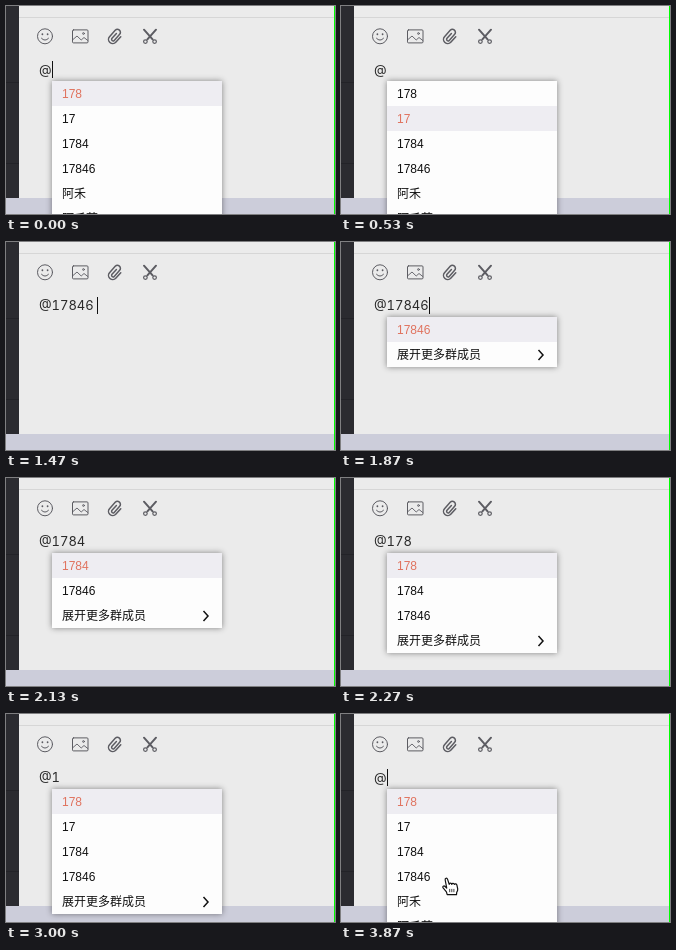
These frames come from a looping animation (329x208 px, 3940 ms). An HTML page:

```html
<!DOCTYPE html>
<html lang="zh">
<head>
<meta charset="utf-8">
<style>
html, body { margin: 0; width: 100%; height: 100%; overflow: hidden; }
body { position: relative; background: #ebebeb; }
svg, #input, #menu { position: absolute; }
#scene, #hand { left: 0; top: 0; }
#input { left: 33px; top: 53px; font: 13px/20px Inter, sans-serif; font-variant-numeric: tabular-nums; white-space: pre; color: #2a2a2a; }
#caret { display: inline-block; width: 1px; height: 17px; vertical-align: -4px; background: #111; }
#menu { left: 46px; top: 75px; width: 170px; background: #fdfdfd; box-shadow: 0 0 6px rgba(0, 0, 0, .45); font: 12px "Liberation Sans", "Noto Sans CJK SC", "Noto Sans CJK", sans-serif; }
.row { height: 25px; line-height: 26px; padding-left: 10px; position: relative; }
.row svg { left: 150px; top: 7px; }
</style>
</head>
<body>
<svg id="scene" width="329" height="208">
  <path fill="#2b2b30" d="M0 0h13v192H0z"/>
  <path fill="#232328" d="M0 76h13v1H0zM0 157h13v1H0z"/>
  <path fill="#d6d6d6" d="M13 11h315v1H13z"/>
  <path fill="#cccdda" d="M0 192h328v16H0z"/>
  <path fill="#0f0" d="M328 0h1v208h-1z"/>
  <g fill="none" stroke="#5c5c62" stroke-linecap="round" stroke-linejoin="round">
    <circle cx="39" cy="30.3" r="7.5"/>
    <path d="M35.5 32.3q3.5 3.8 7 0"/>
    <path stroke-width="1.8" d="M36.4 28.2v.1M41.6 28.2v.1"/>
    <rect x="66.5" y="23.9" width="15.5" height="13" rx="1"/>
    <path stroke-width=".9" d="M67 33.5l4-3.5 4.2 4 2.8-2.5 3.8 3"/>
    <circle cx="77.5" cy="27.5" r=".9" stroke-width=".9"/>
    <path stroke-width="1.5" transform="translate(109.3 30.5) rotate(42)"
      d="M4.2-3.5V4a4.2 4 0 0 1-8.4 0V-4.5a3 3 0 0 1 6 0V3.6a1.5 1.5 0 0 1-3 0V-3"/>
    <path stroke-width="2" d="M138 23.7l8.6 9.6M150 23.7l-8.6 9.6"/>
    <circle cx="139.4" cy="35.6" r="1.8" stroke-width="1.2"/>
    <circle cx="148.6" cy="35.6" r="1.8" stroke-width="1.2"/>
  </g>
</svg>
<div id="input"><span id="text"></span><span id="caret"></span></div>
<div id="menu"></div>
<svg id="hand" width="329" height="208">
  <g transform="translate(101 163.4)" fill="#fff" stroke="#111" stroke-linejoin="round">
    <path stroke-width="1.2" d="M5.2 17.3l-.8-2.8-3.3-4c-1-1.5.8-2.6 2-1.4l1.6 1.5L3.2 2.6c-.4-2 1.8-2.5 2.4-.6l1.6 5c0-1.7 2.3-1.8 2.6-.1.3-1.4 2.3-1.3 2.6.2.5-1.1 2.2-.8 2.5.7l.8 3.7c.2 1.6-.3 2.5-1 3.5l-.2 2.3z"/>
    <path stroke-width=".8" d="M7.7 11.5v3.3M9.8 11.5v3.3M11.9 11.5v3.3"/>
  </g>
</svg>
<script>
const LOOP = 3940, TICK = 1000 / 15;      // the screen refreshes 15 times a second
const KEY_START = 400, KEY_EVERY = 5 * TICK; // arrow key presses
const PICK = 22 * TICK;                   // the chosen name is inserted
const DELETES = [1790, 2060, 2210, 2390, 2790, 3390];
const MENU_LAG = 50, HAND_IN = 3860;
const NAMES = ['178', '17', '1784', '17846', '阿禾', '阿禾苗'];
const TYPED = '17846 ';
const MORE = '展开更多群成员';
const CHEVRON = '<svg width="8" height="12"><path d="M1.5 1l4.5 5-4.5 5" fill="none" stroke="#111" stroke-width="1.5"/></svg>';

const $ = id => document.getElementById(id);
const show = (id, on) => $(id).style.visibility = on ? 'visible' : 'hidden';
const mix = (a, b, k) => `color-mix(in srgb, ${b} ${k * 100}%, ${a})`;

const textAt = t => t < PICK ? '' : TYPED.slice(0, TYPED.length - DELETES.filter(d => d <= t).length);

function selectionAt(t) {
  if (t < KEY_START || t >= PICK) return 0;
  const k = (t - KEY_START) / KEY_EVERY;
  return Math.floor(k) + Math.min(1, k % 1 * 2.5);
}

// Blinking starts over when the name is inserted.
function caretAt(tick) {
  const since = tick < 22 ? tick : tick - 22;
  return Math.floor((since + .65) / 7.6) % 2 === 0;
}

function menuRows(query, selected) {
  const items = NAMES.filter(n => n.startsWith(query));
  if (query) items.push(MORE);
  return items.map((item, i) => {
    const k = Math.max(0, 1 - Math.abs(i - selected));
    const style = `color:${mix('#111', '#e0735f', k)};background:${mix('#fdfdfd', '#eeedf2', k)}`;
    return `<div class="row" style="${style}">${item}${item === MORE ? CHEVRON : ''}</div>`;
  }).join('');
}

function draw(tick) {
  const t = tick * TICK;
  const query = textAt(t < PICK ? t : Math.max(PICK, t - MENU_LAG));
  const open = query !== TYPED;
  $('text').textContent = '@' + textAt(t);
  $('menu').innerHTML = open ? menuRows(query, selectionAt(t)) : '';
  show('menu', open);
  show('caret', caretAt(tick));
  show('hand', t >= HAND_IN);
}

let last;
function frame(now) {
  const tick = Math.floor(now % LOOP / TICK + .06);
  if (tick !== last) draw(last = tick);
  requestAnimationFrame(frame);
}
frame(0);
</script>
</body>
</html>
```
